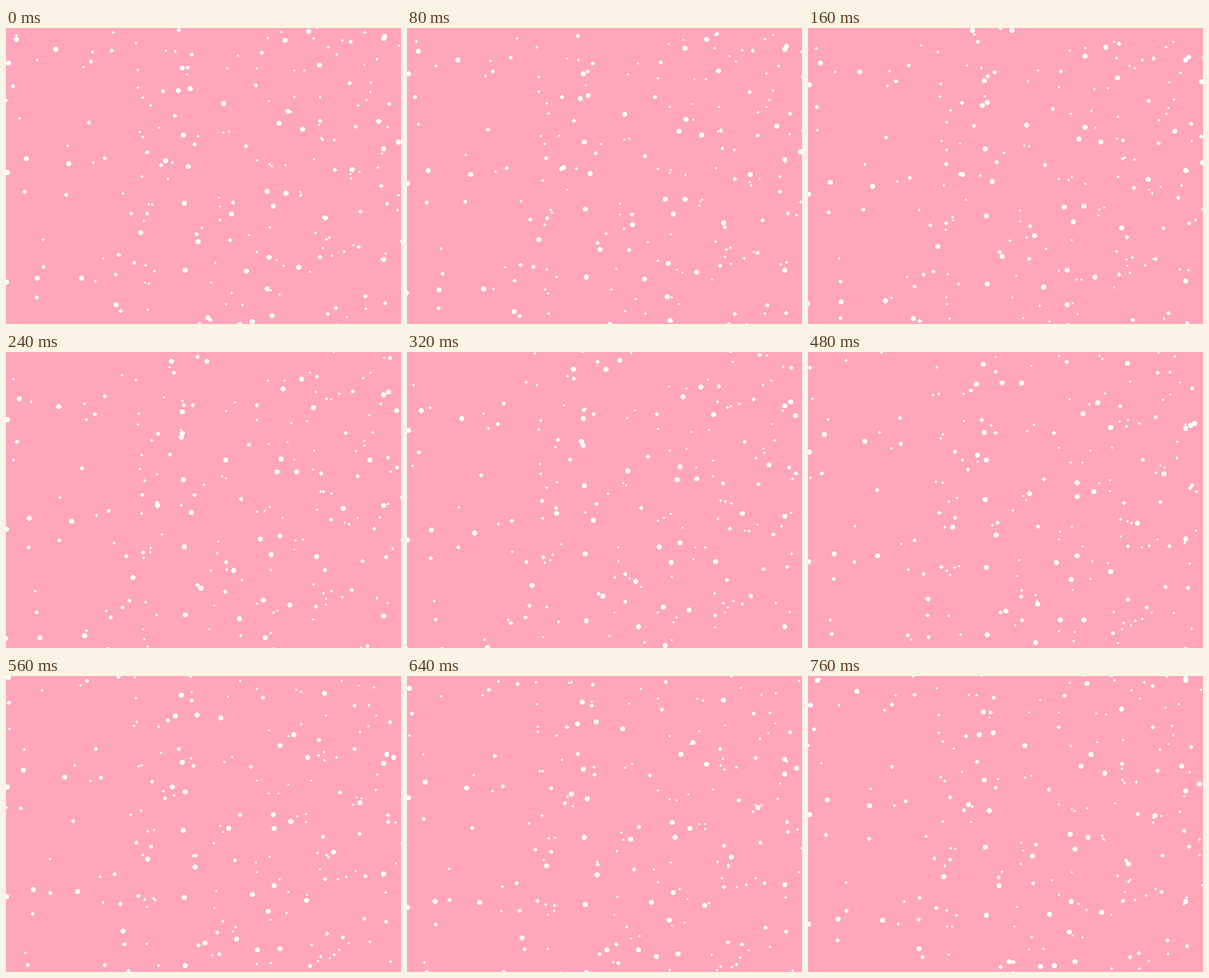
These frames come from a looping animation (400x300 px, 0.8 s). An HTML page with a canvas:

```html
<!DOCTYPE html>
<html lang="en">
<head>
<meta charset="utf-8">
<title>Snowfall</title>
<style>
  html, body { margin: 0; width: 100%; height: 100%; overflow: hidden; background: #ffa6bb; }
  canvas { display: block; width: 400px; height: 300px; }
</style>
</head>
<body>
<canvas id="stage" width="400" height="300"></canvas>
<script>
const LOOP = 800, STEP = 40;
const ctx = document.getElementById('stage').getContext('2d');

// Lanes as [x, y, dx, dy], largest flakes first. Each flake moves by (dx, dy)
// per loop, arriving where the next flake of its lane started.
const lanes = [
  [306, 3, -21, 81], [282, 12, -6, 84], [317, 37, -17, 65], [186, 61, -25, 73],
  [10, 11, 10.5, 121], [2, 35, -1, 111], [404, 45, -27, 49.3], [382, 10, 0, 112],
  [383, 8, 14, 107], [164, -13, 10, 76.5], [220, 76, 8, 112], [178, 40, 1, 68.5],
  [50, 21, 13, 116], [403, 98, -23, 62], [86, 34, 14, 98], [188, 27, 2.5, 91],
  [107, 23, -23, 73], [7, 59, 12, 107], [318, 94, 4, 98], [388, 77, -2, 101],
  [259, 25, -16, 95], [253, 58, -23, 119], [348, 56, -15, 88], [175, 2, -16, 62],
  [349, 14, 5, 86], [198, -10, -13.7, 49.5],
  [87, 24, -25, 95], [311, 10, 8, 101], [108, 4, 30, 66], [340, 12, -8, 101],
  [412, 134, -16, 50], [146, 78, -28, 89], [78, 39, 10, 97], [131, 15, 2, 45]
].map((lane, i) => [...lane, i < 13 ? 5 : i < 26 ? 4 : 3]);

let seed = 7;
const rand = (lo, hi) => {
  seed = (seed * 16807) % 2147483647;
  return lo + (hi - lo) * seed / 2147483647;
};

// Faint small flakes between the main lanes
for (let i = 0; i < 24; i++) {
  lanes.push([rand(0, 400), rand(0, 80), rand(-26, 26), rand(55, 110), i % 3 ? 2 : 3]);
}

function flake(cx, cy, size) {
  const x = Math.round(cx - size / 2), y = Math.round(cy - size / 2);
  if (size < 3) {
    ctx.fillRect(x, y, size, size);
  } else {
    ctx.fillRect(x + 1, y, size - 2, size);
    ctx.fillRect(x, y + 1, size, size - 2);
  }
}

function draw(now) {
  const p = Math.floor((now % LOOP) / STEP) * STEP / LOOP;
  ctx.fillStyle = '#ffa6bb';
  ctx.fillRect(0, 0, 400, 300);
  ctx.fillStyle = '#fff';
  for (const [x, y, dx, dy, size] of lanes) {
    for (let n = Math.floor((-5 - y) / dy); y + dy * (n + p) < 305; n++) {
      flake(x + dx * (n + p), y + dy * (n + p), size);
    }
  }
}

function tick() {
  draw(performance.now());
  requestAnimationFrame(tick);
}
tick();
</script>
</body>
</html>
```
